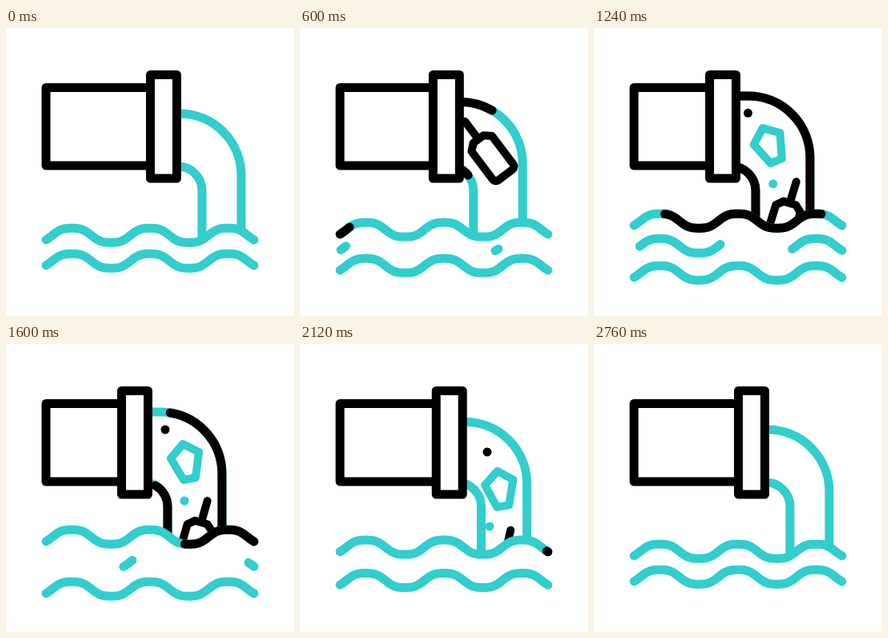
Recreate the animation shown at these times as an HTML page with a canvas. Size 360 by 360 pixels, loop 2800 ms.

```html
<!DOCTYPE html>
<html lang="en">
<head>
<meta charset="utf-8">
<title>Waste pipe</title>
<style>
  html, body { margin: 0; height: 100%; overflow: hidden; background: #fff; }
  canvas { display: block; }
</style>
</head>
<body>
<canvas id="stage" width="360" height="360"></canvas>
<script>
const ctx = document.getElementById('stage').getContext('2d');
const LOOP = 2800, STEP = 40;
const WATER = '#32cdcd', INK = '#000';

// Keys: time, x, y, rotation in degrees
const bottleKeys = [
  [280, 120, 122, -90], [600, 223, 139, -37], [960, 243, 207, 10],
  [1600, 244, 223, 16], [1920, 251, 235, 13], [2120, 257, 260, 13], [2400, 262, 335, 13]
];
const chunkKeys = [
  [600, 165, 122, -60], [960, 209.5, 143, -25], [1600, 225, 147, 0],
  [1920, 237, 156, 2], [2120, 250, 181, 2], [2400, 262, 300, 2]
];
const inkDotKeys = [
  [600, 165, 107], [960, 186, 107], [1600, 199, 107],
  [1920, 211, 117], [2120, 234, 135], [2560, 266, 290]
];
const waterDotKeys = [
  [600, 180, 140], [960, 219, 188], [1600, 223, 196],
  [1920, 228, 207], [2120, 237, 228], [2340, 243, 290]
];

const progress = (t, a, b) => Math.min(1, Math.max(0, (t - a) / (b - a)));
const ease = (t, a, b) => { const p = progress(t, a, b); return p * p * (3 - 2 * p); };
const easeOut = (t, a, b) => 1 - (1 - progress(t, a, b)) ** 2;

// Smooth cubic interpolation through the keys
function track(keys, t) {
  const last = keys.length - 1;
  if (t <= keys[0][0]) return keys[0].slice(1);
  if (t >= keys[last][0]) return keys[last].slice(1);
  const i = keys.findIndex(k => k[0] > t) - 1;
  const a = keys[i], b = keys[i + 1], span = b[0] - a[0], p = (t - a[0]) / span;
  const slope = (n, c) => {
    const k0 = keys[Math.max(0, n - 1)], k1 = keys[Math.min(last, n + 1)];
    return (k1[c] - k0[c]) / (k1[0] - k0[0]) * span;
  };
  return a.slice(1).map((_, n) => {
    const c = n + 1, q = 1 - p;
    return a[c] * (1 + 2 * p) * q * q + slope(i, c) * p * q * q
         + b[c] * p * p * (3 - 2 * p) - slope(i + 1, c) * p * p * q;
  });
}

function waveY(x, base) {
  const a = (x - 82.3) / 97.6 * 2 * Math.PI;
  return base - 9.8 * Math.cos(a) + 0.8 * Math.cos(3 * a);
}

function traceWave(base, x0, x1) {
  for (let x = x0; x < x1; x++) ctx.lineTo(x, waveY(x, base));
  ctx.lineTo(x1, waveY(x1, base));
}

function wave(base, color, from = 0, to = 1, x0 = 50, x1 = 310) {
  if (to <= from) return;
  ctx.beginPath();
  traceWave(base, x0 + (x1 - x0) * from, x0 + (x1 - x0) * to);
  ctx.strokeStyle = color;
  ctx.stroke();
}

// Short run, quarter turn, then straight down; ink covers part of its length
function stream(x, top, r, lead, bottom, from, to) {
  const length = lead + r * Math.PI / 2 + bottom - top - r;
  ctx.beginPath();
  ctx.moveTo(x - r - lead, top);
  ctx.arc(x - r, top + r, r, -Math.PI / 2, 0);
  ctx.lineTo(x, bottom);
  ctx.strokeStyle = WATER;
  ctx.stroke();
  if (to <= from) return;
  ctx.setLineDash([(to - from) * length, 9 * length]);
  ctx.lineDashOffset = -from * length;
  ctx.strokeStyle = INK;
  ctx.stroke();
  ctx.setLineDash([]);
}

function placed([x, y, degrees], draw) {
  ctx.save();
  ctx.translate(x, y);
  ctx.rotate(degrees * Math.PI / 180);
  ctx.beginPath();
  draw();
  ctx.stroke();
  ctx.restore();
}

function bottle() {
  ctx.moveTo(0, -28);
  ctx.lineTo(0, 0);
  ctx.moveTo(-8, 0);
  ctx.lineTo(8, 0);
  ctx.lineTo(16, 7);
  ctx.arcTo(16, 56, 0, 56, 5);
  ctx.arcTo(-16, 56, -16, 0, 5);
  ctx.lineTo(-16, 7);
  ctx.closePath();
}

function chunk() {
  [[-4, -22], [16, -12], [12, 20], [-3, 23], [-19, -4]].forEach(p => ctx.lineTo(...p));
  ctx.closePath();
}

function dot([x, y], color) {
  ctx.beginPath();
  ctx.arc(x, y, 5.5, 0, 2 * Math.PI);
  ctx.fillStyle = color;
  ctx.fill();
}

function box(x, y, w, h) {
  ctx.beginPath();
  ctx.rect(x, y, w, h);
  ctx.fillStyle = '#fff';
  ctx.fill();
  ctx.strokeStyle = INK;
  ctx.stroke();
}

function render(t) {
  const slide = ease(t, 240, 1080) - ease(t, 1790, 2300);
  const swell = ease(t, 200, 860) - ease(t, 1770, 2410);
  const surface = 259.2 - 18 * slide;
  const bottom = 262 - 18 * slide;
  const inkEnd = ease(t, 430, 930);

  ctx.fillStyle = '#fff';
  ctx.fillRect(0, 0, 360, 360);
  ctx.lineWidth = 11;
  ctx.lineCap = ctx.lineJoin = 'round';

  stream(294 - 24 * swell, 107 - 22 * swell, 77, 20, bottom, ease(t, 1440, 2107), inkEnd);
  stream(245 - 43 * swell, 173, 30, 0, bottom, ease(t, 1490, 1900), inkEnd);

  ctx.strokeStyle = WATER;
  ctx.lineWidth = 10;
  placed(track(chunkKeys, t), chunk);
  dot(track(waterDotKeys, t), WATER);
  dot(track(inkDotKeys, t), INK);
  ctx.strokeStyle = INK;
  placed(track(bottleKeys, t), bottle);
  ctx.lineWidth = 11;

  // Hide everything that has sunk
  ctx.beginPath();
  traceWave(surface, 0, 360);
  ctx.lineTo(360, 360);
  ctx.lineTo(0, 360);
  ctx.fillStyle = '#fff';
  ctx.fill();

  box(50, 74.5, 140 - 36 * slide, 97.5);
  box(180.5 - 36 * slide, 58.5, 33, 129.5);

  wave(surface, WATER);
  wave(surface, INK, easeOut(t, 1160, 2200), ease(t, 477, 1425));
  const from = ease(t, 1160, 1710), to = ease(t, 518, 1068);
  wave(272.3, WATER, from, to, 51, 158);
  wave(272.3, WATER, from, to, 244, 310);
  wave(291.2 + 15 * slide, WATER);
}

function frame() {
  const t = performance.now() % LOOP;
  render(Math.floor(t / STEP) * STEP);
  requestAnimationFrame(frame);
}
frame();
</script>
</body>
</html>
```
